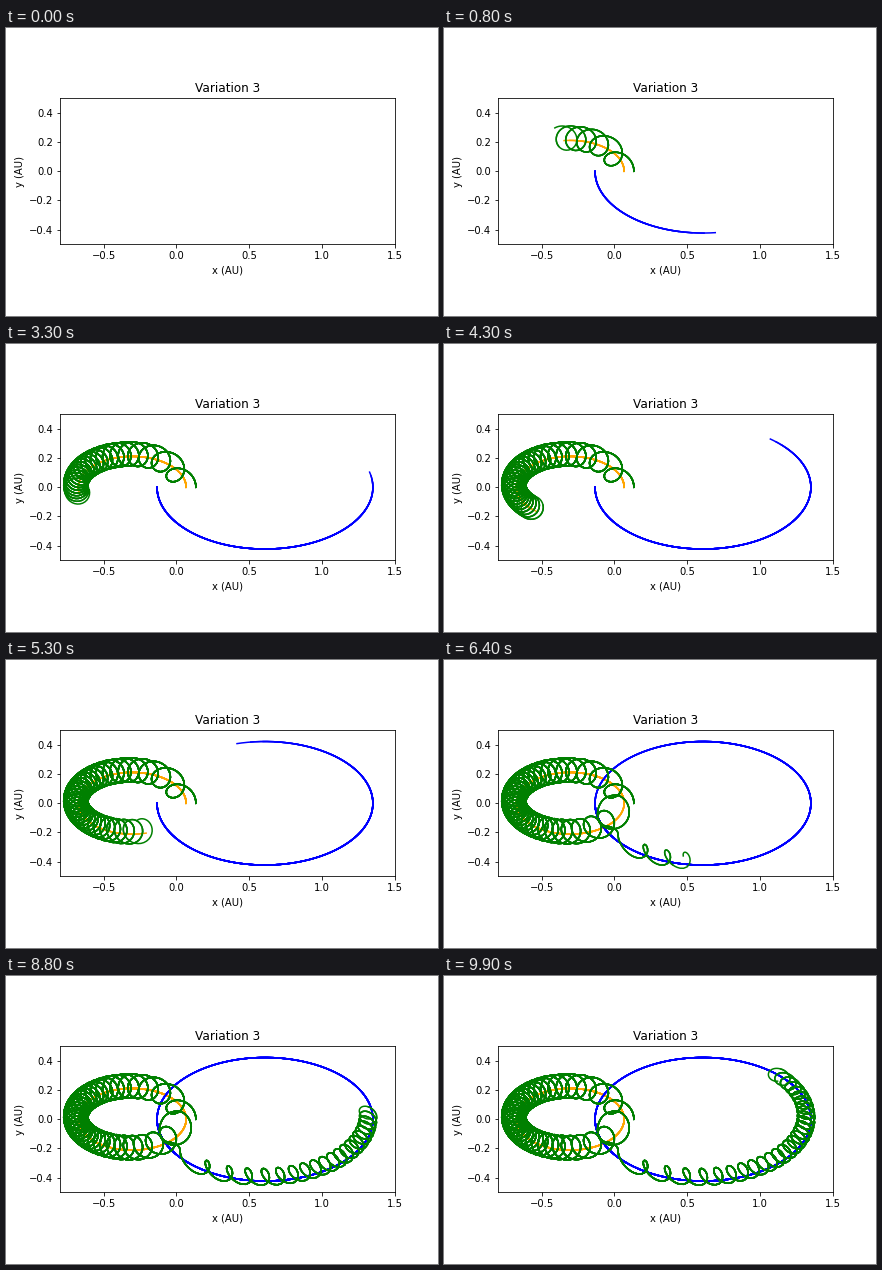
Animation of 432x288 px, one loop 10 s. Source, as a matplotlib script:

```python
import numpy as np
import matplotlib.pyplot as plt
from matplotlib.animation import FuncAnimation

FRAMES = 100
STEPS = 24                     # path samples per frame
PERIOD = 57.75                 # binary period, in frames
A_REL, ECC = 1.1122, 0.82      # relative orbit of the two stars
LAGS = [65, 45, 30, 20, 14, 10, 7, 5, 3, 2, 1, 0]


def anomaly(m, e):
    """Eccentric anomaly from mean anomaly (Newton)."""
    turn = np.floor(m / (2 * np.pi)) * 2 * np.pi
    m = m - turn
    ea = np.full_like(m, np.pi)
    for _ in range(30):
        ea = ea - (ea - e * np.sin(ea) - m) / (1 - e * np.cos(ea))
    return ea + turn


def orbit(m, a, e, peri):
    """Position relative to the focus, periapsis at angle peri."""
    ea = anomaly(m, e)
    x = a * (np.cos(ea) - e)
    y = a * np.sqrt(1 - e * e) * np.sin(ea)
    c, s = np.cos(peri), np.sin(peri)
    return np.array([c * x - s * y, s * x + c * y])


def stars(t):
    rel = orbit(2 * np.pi * t / PERIOD, A_REL, ECC, 0.0)
    return rel / 3, -rel * 2 / 3


def around_first(t):
    ramp = np.clip(t / 2.5, 0, 1)
    peri = -np.radians(45) * ramp
    e = 0.21 + 0.06 * ramp
    return stars(t)[0] + orbit(2 * np.pi * t / 1.5 - peri, 0.0852, e, peri)


def around_second(t):
    apo = np.radians(135 + 17 * np.clip((t - 70) / 29, 0, 1))
    m = np.pi + 2 * np.pi * (t - 61.14) / 1.38
    return stars(t)[1] + orbit(m, 0.0639, 0.62, apo - np.pi)


def hermite(t, kt, kp):
    """Smooth curve through points kp at times kt."""
    slope = np.gradient(kp, kt, axis=1)
    i = np.clip(np.searchsorted(kt, t, side="right") - 1, 0, len(kt) - 2)
    h = kt[i + 1] - kt[i]
    u = (t - kt[i]) / h
    return (kp[:, i] * (1 + 2 * u) * (1 - u) ** 2
            + kp[:, i + 1] * u * u * (3 - 2 * u)
            + slope[:, i] * h * u * (1 - u) ** 2
            + slope[:, i + 1] * h * u * u * (u - 1))


def planet(t):
    leave, join = 57.5, 59.7
    before = np.array([leave - 0.1, leave])
    after = np.array([join, join + 0.1])
    mid_t = [57.8, 58.1, 58.4, 58.7, 59.0, 59.35]
    mid = np.array([[-0.072, -0.110, -0.113, -0.079, -0.024, 0.0175],
                    [0.029, -0.032, -0.101, -0.149, -0.163, -0.190]])
    kt = np.concatenate([before, mid_t, after])
    kp = np.hstack([around_first(before), mid, around_second(after)])
    return np.where(t <= leave, around_first(t),
                    np.where(t >= join, around_second(t), hermite(t, kt, kp)))


t = np.arange((FRAMES - 1) * STEPS + 1) / STEPS
star1, star2 = stars(t)
bodies = [(star1, "orange"), (star2, "blue"), (planet(t), "green")]

plt.rcParams.update({"font.family": "DejaVu Sans", "font.size": 10})
fig = plt.figure(figsize=(6, 4), dpi=72, facecolor="white")
fig.subplots_adjust(left=0.125, right=0.9, bottom=0.125, top=0.88)
ax = fig.add_subplot()
ax.set_aspect("equal")
ax.set_xlim(-0.8, 1.5)
ax.set_ylim(-0.5, 0.5)
ax.set_xticks([-0.5, 0, 0.5, 1, 1.5])
ax.set_yticks([-0.4, -0.2, 0, 0.2, 0.4])
ax.set_title("Variation 3")
ax.set_xlabel("x (AU)")
ax.set_ylabel("y (AU)")

# Each trail is overdrawn, so its older parts look heavier.
trails = [(ax.plot([], [], color=color, lw=1.5)[0], path, lag)
          for path, color in bodies for lag in LAGS]


def update(k):
    for line, path, lag in trails:
        n = (k - lag) * STEPS + 1 if k > lag else 0
        line.set_data(path[0, :n], path[1, :n])
    return [line for line, _, _ in trails]


anim = FuncAnimation(fig, update, frames=FRAMES, interval=100,
                     init_func=lambda: update(0), repeat=True,
                     repeat_delay=0, blit=False)
plt.show()
```
